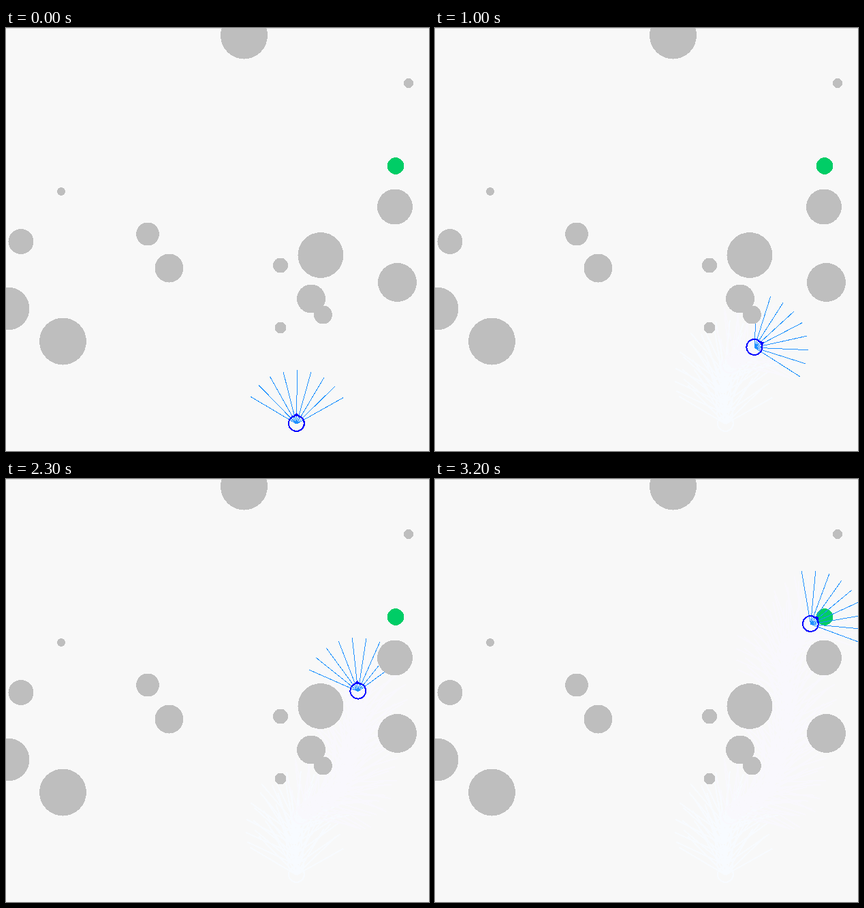
Write an HTML page that moves like this. It is 621 by 621 pixels and loops after 3300 ms.

```html
<!DOCTYPE html>
<html>
<head>
<meta charset="utf-8">
<style>
html, body { margin: 0; width: 100%; height: 100%; overflow: hidden; background: #f8f8f8; }
svg { display: block; shape-rendering: crispEdges; }
path { fill: none; }
</style>
</head>
<body>
<svg width="621" height="621">
  <rect width="621" height="1" fill="#d8d8d8"/>
  <g id="trail"></g>
  <g id="obstacles" fill="#bebebe">
    <circle cx="349.5" cy="11" r="34.5"/>
    <circle cx="591" cy="81" r="7"/>
    <circle cx="571" cy="262.5" r="26"/>
    <circle cx="574.5" cy="373.5" r="28.5"/>
    <circle cx="462" cy="333.5" r="33.5"/>
    <circle cx="403" cy="348.5" r="11"/>
    <circle cx="448" cy="397.5" r="21"/>
    <circle cx="465.5" cy="421" r="13.5"/>
    <circle cx="403" cy="440" r="8.5"/>
    <circle cx="81" cy="240" r="6"/>
    <circle cx="208" cy="302.5" r="17"/>
    <circle cx="239.5" cy="352.5" r="21"/>
    <circle cx="22" cy="313.5" r="18.5"/>
    <circle cx="3" cy="412" r="31.5"/>
    <circle cx="83.5" cy="460" r="34.5"/>
  </g>
  <circle cx="572" cy="202.5" r="12.3" fill="#00cd66"/>
  <g id="robot"></g>
</svg>
<script>
const STEP = 100, STEPS = 33, RANGE = 79, RAD = Math.PI / 180;
const [trail, obstacleGroup, robot] =
  ['trail', 'obstacles', 'robot'].map(id => document.getElementById(id));
const obstacles = [...obstacleGroup.children].map(c =>
  ['cx', 'cy', 'r'].map(name => +c.getAttribute(name)));

// Waypoints: step, x, y, heading in degrees
const route = [
  [0, 426, 580, 89.3], [6, 432.5, 494.5, 50.8], [10, 468.5, 468, 27.5],
  [12, 487, 453, 34], [15, 501, 419, 86], [19, 515, 368, 75.5],
  [26, 512.5, 267, 91], [32, 551, 212, 39.7]
];

// Hermite curve between waypoints; the robot faces along its path
function poseAt(step) {
  const i = Math.max(1, route.findIndex(k => k[0] >= step));
  const [t0, x0, y0, h0] = route[i - 1], [t1, x1, y1, h1] = route[i];
  const u = (step - t0) / (t1 - t0), pull = Math.hypot(x1 - x0, y1 - y0);
  const curve = (p, q, m, n) => ({
    at: p + (q - p) * u * u * (3 - 2 * u) + m * u * (1 - u) ** 2 - n * u * u * (1 - u),
    slope: 6 * u * (1 - u) * (q - p) + m * (1 - u) * (1 - 3 * u) + n * u * (3 * u - 2)
  });
  const x = curve(x0, x1, pull * Math.cos(h0 * RAD), pull * Math.cos(h1 * RAD));
  const y = curve(y0, y1, -pull * Math.sin(h0 * RAD), -pull * Math.sin(h1 * RAD));
  return { x: x.at, y: y.at, deg: Math.atan2(-y.slope, x.slope) / RAD };
}

// Distance along a ray to the nearest obstacle, limited to the sensor range
function reach(x, y, dx, dy) {
  let best = RANGE;
  for (const [ox, oy, r] of obstacles) {
    const along = (ox - x) * dx + (oy - y) * dy;
    const off = (ox - x) * dy - (oy - y) * dx;
    if (along > 0 && Math.abs(off) < r) {
      best = Math.min(best, along - Math.sqrt(r * r - off * off));
    }
  }
  return Math.max(0, best);
}

function robotShape(step, rayColor, bodyColor, rayWidth) {
  const { x, y, deg } = poseAt(step);
  const ox = x + 0.5, oy = y + 1.2;
  let rays = '';
  for (let a = deg - 60; a < deg + 61; a += 15) {
    const dx = Math.cos(a * RAD), dy = -Math.sin(a * RAD);
    const d = reach(ox, oy, dx, dy);
    rays += `M${ox} ${oy}l${dx * d} ${dy * d}`;
  }
  return `<path d="${rays}" stroke="${rayColor}" stroke-width="${rayWidth}"/>
    <g transform="translate(${x + 0.4} ${y + 0.5}) rotate(${-deg})"
      fill="none" stroke="${bodyColor}" stroke-width="2">
      <circle r="11.5"/><path d="M9 -5L14 0L9 5"/></g>`;
}

function draw(step) {
  trail.innerHTML = Array.from({ length: step }, (_, s) => {
    const color = s < 6 ? '#f8fbff' : '#f9f8fd';
    return robotShape(s, color, color, 2);
  }).join('');
  robot.innerHTML = robotShape(step, '#1e90ff', '#0000ff', 1);
}

const start = performance.now();
let shown = -1;
function tick() {
  const step = Math.floor((performance.now() - start) / STEP) % STEPS;
  if (step !== shown) draw(shown = step);
  requestAnimationFrame(tick);
}
tick();
</script>
</body>
</html>
```
